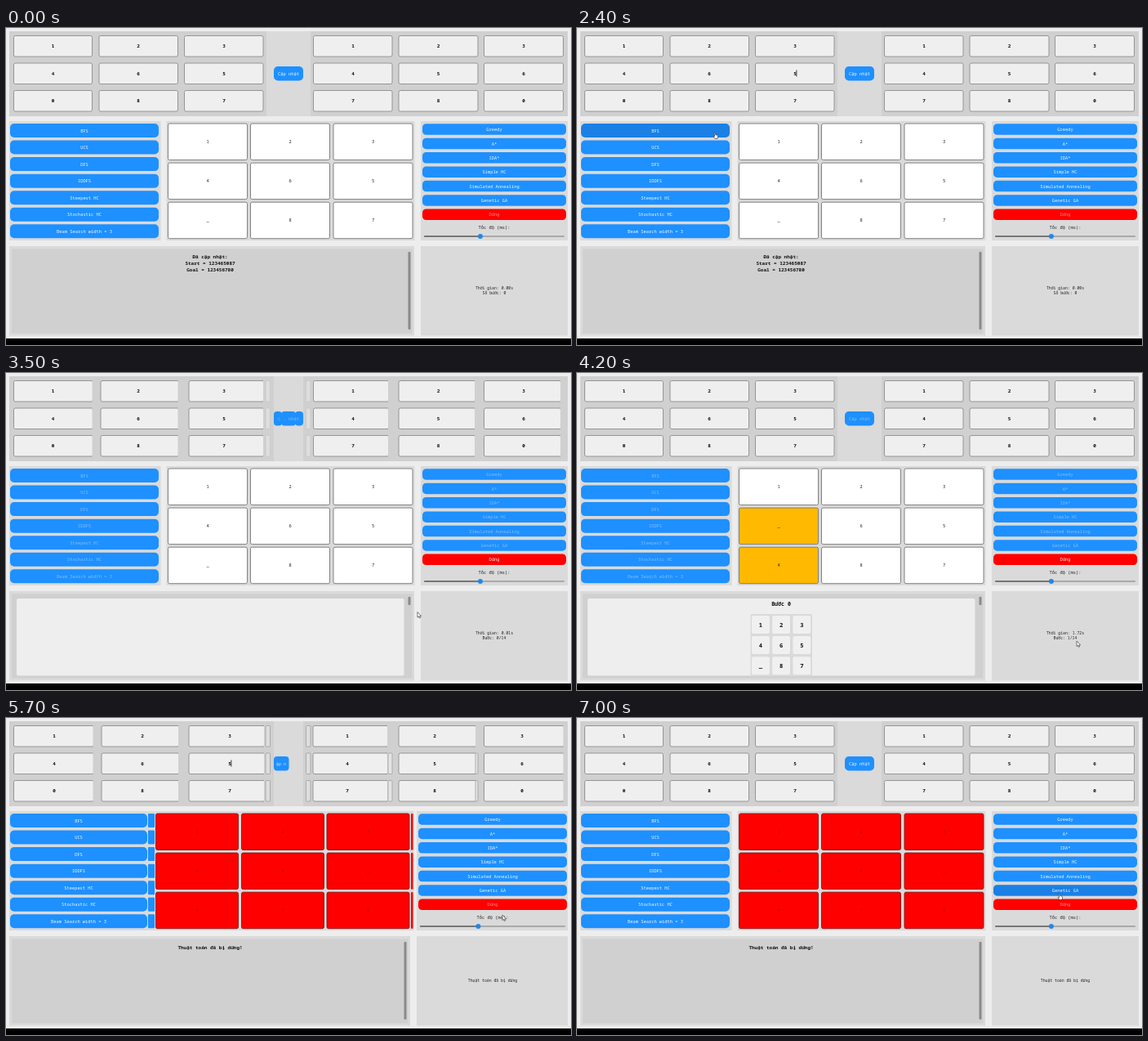
Write an HTML page that moves like this. It is 692 by 388 pixels and loops after 8 s.

```html
<!DOCTYPE html>
<html lang="vi">
<head>
<meta charset="utf-8">
<title>8-puzzle solver</title>
<style>
html, body { margin: 0; width: 100%; height: 100%; overflow: hidden; background: #ededed; }
svg { display: block; width: 692px; height: 388px; }
text { font-family: "Noto Sans Mono", "DejaVu Sans Mono", monospace; text-anchor: middle; white-space: pre; }
</style>
</head>
<body>
<svg id="stage" viewBox="0 0 692 388"></svg>
<script>
const LOOP = 8000, TICK = 100;
const RUN = 2800, SETTLE = 2900, SHOW = 3700, STOP = 5500, RELAX = 6000;
const BLUE = '#1e90ff', PANEL = '#dadada', INNER = '#d0d0d0';

const WIDE = {
  left: [5, 182], tiles: [198.5, 299.5, 401], tileW: 97, right: [510, 176],
  panels: [[4, 185.5], [196.5, 304], [508, 180]], scroll: 492.5,
  cells: [[[9.5, 96], [114, 96.5], [218.5, 96.5]], [[376.5, 96.5], [481, 97], [585.5, 97]]],
  labels: [[57.5, 162, 267], [425, 529.5, 634]]
};
const NARROW = {
  left: [5, 168], tiles: [183.5, 288.5, 393], tileW: 101, right: [505, 182],
  panels: [[4, 178], [182, 317.5], [503, 185]], scroll: 487.5,
  cells: [[[9.5, 97], [117, 94], [224, 92]], [[376, 91], [481, 94], [585.5, 97]]],
  labels: [[59, 167, 274], [418, 525, 632]]
};
const SPLIT = [[[9.5, 96], [116, 94.5], [224, 91]], [[376.5, 91.5], [481, 93], [585.5, 93.5]]];

const START = '123465087', GOAL = '123456780';
const LEFT = ['BFS', 'UCS', 'DFS', 'IDDFS', 'Steepest HC', 'Stochastic HC', 'Beam Search width = 3'];
const RIGHT = ['Greedy', 'A*', 'IDA*', 'Simple HC', 'Simulated Annealing', 'Genetic GA', 'Dừng'];

// time, board, changed cells, elapsed seconds
const STEPS = [
  [RUN, '123465087', [], '0.01'],
  [4200, '123065487', [3, 6], '1.72'],
  [4400, '123605487', [3, 4], '1.95'],
  [4600, '123685407', [4, 7], '2.18'],
  [4900, '123685470', [7, 8], '2.41'],
  [5100, '123680475', [5, 8], '2.64']
];

// time, x, y of the pointer tip
const PATH = [
  [500, 504, 224], [600, 504, 224], [700, 598, 231], [1000, 440, 196], [1400, 152, 129], [1500, 152, 129],
  [1900, 394, 142], [2000, 394, 142], [2400, 168, 128], [2900, 168, 128],
  [3600, 560, 320], [4200, 612, 328], [4500, 612, 328], [5000, 600, 228],
  [5500, 600, 228], [5700, 608, 241], [6300, 592, 300], [6400, 592, 300],
  [6900, 590, 215], [8000, 590, 215]
];

const rect = (x, y, w, h, fill, r = 0, stroke = 'none', sw = 1) =>
  `<rect x="${x}" y="${y}" width="${w}" height="${h}" rx="${r}" fill="${fill}" stroke="${stroke}" stroke-width="${sw}"/>`;
const label = (s, x, y, size, fill = '#222', weight = 400) =>
  `<text x="${x}" y="${y + size * 0.36}" font-size="${size}" font-weight="${weight}" fill="${fill}">${s}</text>`;
const grid = draw => Array.from({ length: 9 }, (_, i) => draw(i % 3, Math.floor(i / 3), i)).join('');
const glyph = c => c === '0' ? '_' : c;

function pointerAt(t) {
  if (t < PATH[0][0]) return null;
  const i = Math.max(1, PATH.findIndex(p => p[0] >= t));
  const [a, b] = [PATH[i - 1], PATH[i]];
  const k = (t - a[0]) / (b[0] - a[0]);
  return [a[1] + (b[1] - a[1]) * k, a[2] + (b[2] - a[2]) * k];
}

function caretOn(t) {
  if (t >= 400 && t < RUN) return (t + 600) % 1000 < 500;
  return t >= STOP && t < 7000 && (t - STOP) % 1000 < 500;
}

function inputs(L, split, narrow, caret) {
  const cells = split ? SPLIT : L.cells;
  let s = rect(4, 4, 684, 104, INNER);
  s += narrow || split ? rect(328, 4, 36, 104, PANEL) : rect(319, 4, 54, 104, PANEL);
  [START, GOAL].forEach((digits, side) => {
    s += grid((c, r, i) => {
      const [x, w] = cells[side][c], y = 9.5 + r * 33.5;
      const open = narrow || split;
      const box = open
        ? rect(x, y, w, 25.5, '#efefef', 2) +
          `<path d="M${x + w} ${y}H${x + 2}q-2 0-2 2v21.500q0 2 2 2H${x + w}" fill="none" stroke="#8d8d8d" stroke-width=".9"/>`
        : rect(x, y, w, 25.5, '#efefef', 2, '#8d8d8d', 0.9);
      return box + label(digits[i], L.labels[side][c], y + 12.8, 6, '#111', 700);
    });
  });
  if (narrow || split) {
    for (let y = 9.5; y < 80; y += 33.5) {
      s += rect(318, y, 5.5, 25.5, '#dedede', 1, narrow ? '#999' : '#c4c4c4', 0.7);
      s += rect(367.5, y, 5.5, 25.5, '#dedede', 1, narrow ? '#999' : '#c4c4c4', 0.7);
      if (narrow && y > 20)
        s += rect(468, y, 5, 25.5, '#e4e4e4', 1, '#999', 0.7) + rect(575, y, 3, 25.5, '#e4e4e4', 1, '#999', 0.7);
    }
  }
  if (caret) s += rect(L.labels[0][2] + 1.5, 51.5, 0.8, 8, '#111');
  return s;
}

function updateButton(narrow, split, enabled) {
  if (narrow) return rect(328, 47, 18.5, 17.5, BLUE, 4) + label('ập n', 337, 55.8, 5.2, '#cfe6ff');
  if (split) {
    return rect(328, 47, 10, 17.5, BLUE, 4) + rect(337, 47, 18, 17.5, BLUE, 4) +
      rect(354, 47, 10, 17.5, BLUE, 4) + label('C ₊ nhật', 346, 55.8, 5.4, '#7fbcf5');
  }
  return rect(328, 47, 36, 17.5, BLUE, 5) + label('Cập nhật', 346, 55.8, 5.4, enabled ? '#f4f9ff' : '#82bff8');
}

function button(name, [x, w], mid, h, ptr, enabled) {
  const red = name === 'Dừng';
  const over = enabled && ptr && ptr[0] > x && ptr[0] < x + w && Math.abs(ptr[1] - mid) < h / 2;
  const fill = red ? (over ? '#cc0000' : '#ff0000') : (over ? '#1a80e6' : BLUE);
  const ink = enabled ? '#f2f8ff' : red ? '#ff8f8f' : '#82bff8';
  return { over, svg: rect(x, mid - h / 2, w, h, fill, h > 15 ? 5 : 4.5) + label(name, x + w / 2, mid + 0.2, 5.4, ink) };
}

function tiles(L, board, hot, stopped, narrow) {
  let s = grid((c, r, i) => {
    const x = L.tiles[c], y = 117 + r * 48.1;
    const fill = stopped ? '#ff0000' : hot.includes(i) ? '#ffb900' : '#ffffff';
    return rect(x, y, L.tileW, 44.5, fill, 2, stopped ? '#8c1010' : '#777', 0.9) +
      label(glyph(board[i]), x + L.tileW / 2, y + 22.3, 5.4, stopped ? '#b80000' : '#222');
  });
  if (narrow) {
    for (let r = 0; r < 3; r++) s += rect(496, 117 + r * 48.1, 2.5, 44.5, stopped ? '#ff0000' : '#ffffff');
    for (let i = 0; i < 7; i++) s += rect(174, 117 + i * 20.55, 8, 17, BLUE, 1);
  }
  return s;
}

function output(L, t, running, stopped) {
  const right = L.panels[2];
  let s = rect(4, 267, L.scroll + 3.5, 109.5, PANEL) + rect(7, 270.5, L.scroll - 2, 103, INNER) +
    rect(right[0], 267, right[1], 109.5, PANEL) +
    rect(L.scroll, 274, 3, running ? 10 : 95, '#8a8a8a', 1);
  if (running) {
    s += rect(13, 276, 474.5, 94.500, '#eeeeee', 2);
    if (t >= SHOW) {
      s += label('Bước 0', 250, 283, 6.6, '#111', 700) + rect(212.5, 295, 75.5, 75.5, '#dadada', 2);
      s += grid((c, r, i) => {
        const x = 214 + c * 25.2, y = 297 + r * 25.1;
        return rect(x, y, 21.8, 22, '#f0f0f0', 2) + label(glyph(START[i]), x + 10.900, y + 11, 7.2, '#111', 700);
      });
    }
    return s;
  }
  const lines = stopped ? ['Thuật toán đã bị dừng!'] : ['Đã cập nhật:', 'Start = ' + START, 'Goal = ' + GOAL];
  return s + lines.map((l, i) => label(l, 250, (stopped ? 281 : 280) + i * 8, 6, '#111', 700)).join('');
}

function pointer([x, y], hand) {
  const d = hand
    ? 'M0 0q1-.8 1.300.4l.5 2.300 2.200.6q.9.4.6 1.500l-.6 2.700H1L-1 4.800q.3-1 1.200-.2L.7 4.800z'
    : 'M0 0v6.600l1.500-1.300 1 2.200 1.100-.5-1-2.100h2z';
  return `<path transform="translate(${x} ${y})" d="${d}" fill="#fff" stroke="#222" stroke-width=".6"/>`;
}

function scene(t) {
  const running = t >= RUN && t < STOP, stopped = t >= STOP;
  const narrow = (t >= RUN && t < SETTLE) || (t >= STOP && t < RELAX);
  const split = t >= SETTLE && t < SHOW;
  const L = narrow ? NARROW : WIDE;
  const step = Math.max(0, STEPS.filter(s => s[0] <= t).length - 1);
  const [, board, hot, secs] = STEPS[step];
  const ptr = pointerAt(t);

  let s = rect(0, 0, 692, 388, '#ededed') + rect(0, 380, 692, 8, '#000');
  s += inputs(L, split, narrow, caretOn(t)) + updateButton(narrow, split, !running);
  s += L.panels.map(([x, w]) => rect(x, 114, w, 146, PANEL)).join('');

  const buttons = [
    ...LEFT.map((n, i) => button(n, L.left, 125.500 + i * 20.55, 17, ptr, !running)),
    ...RIGHT.map((n, i) => button(n, L.right, 124 + i * 17.38, 13.5, ptr, (n === 'Dừng') === running))
  ];
  s += buttons.map(b => b.svg).join('') + tiles(L, board, hot, stopped, narrow);

  const [rx, rw] = L.right, mid = rx + rw / 2, knob = rx + rw * 0.403;
  s += label('Tốc độ (ms):', mid, 243.8, 5.4) + rect(rx + 2, 254.3, rw - 4, 1.4, '#999', 0.7) +
    rect(rx + 2, 254.3, knob - rx - 2, 1.4, '#666', 0.7) +
    `<circle cx="${knob}" cy="255" r="3" fill="#2387e6"/>`;

  s += output(L, t, running, stopped);
  const info = stopped ? ['Thuật toán đã bị dừng']
    : running ? [`Thời gian: ${secs}s`, `Bước: ${step}/14`] : ['Thời gian: 0.00s', 'Số bước: 0'];
  s += info.map((l, i) => label(l, mid, (stopped ? 321.5 : 318.5) + i * 6, 4.8)).join('');

  if (ptr) s += pointer(ptr, buttons.some(b => b.over));
  return s;
}

const stage = document.getElementById('stage');
const born = performance.now();
let shown = -1;
function frame() {
  const t = Math.floor((performance.now() - born) % LOOP / TICK) * TICK;
  if (t !== shown) stage.innerHTML = scene(shown = t);
  requestAnimationFrame(frame);
}
frame();
</script>
</body>
</html>
```
